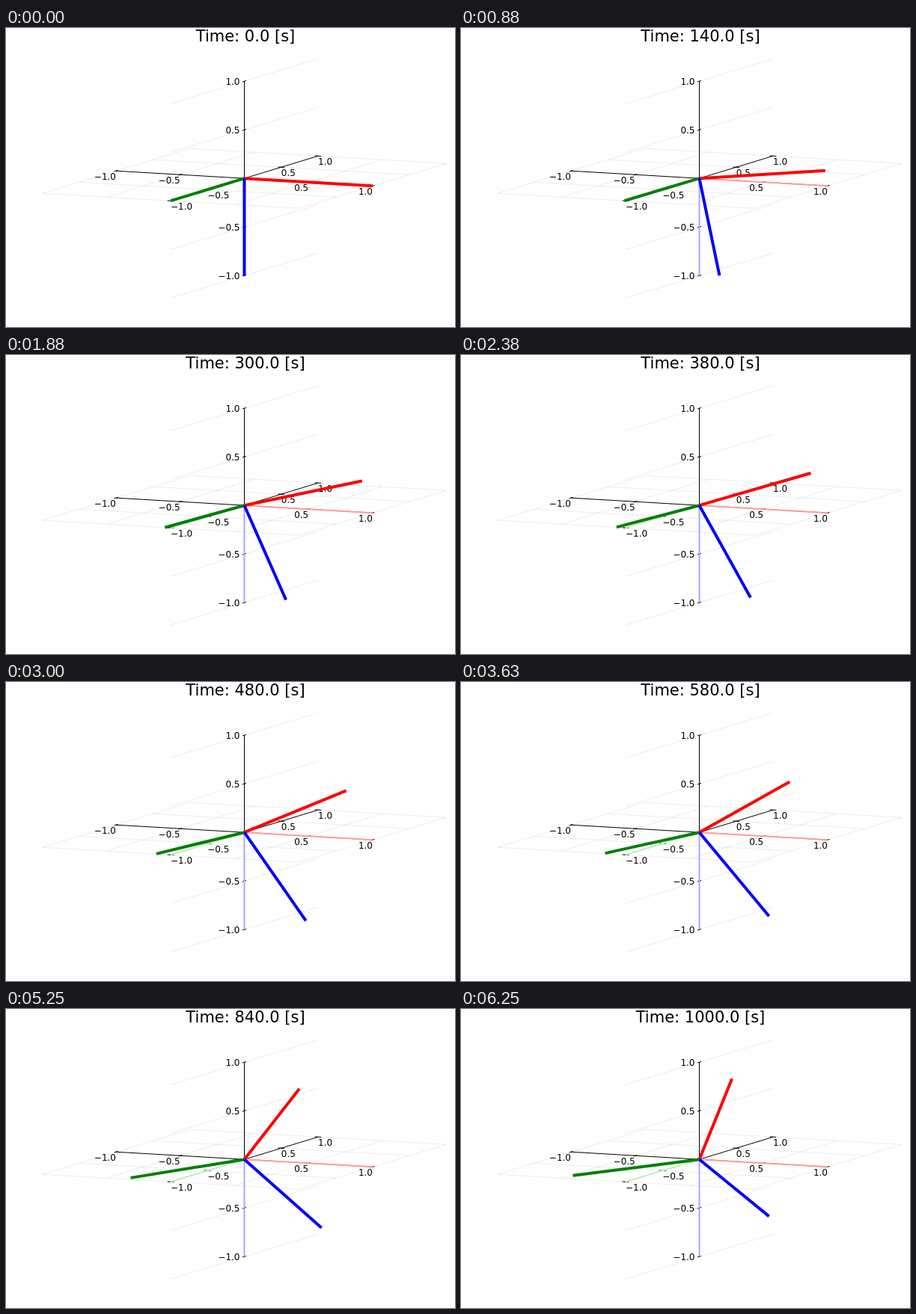
Animation of 600x400 px, one loop 6370 ms. Source, as an HTML page:

```html
<!DOCTYPE html>
<html lang="en">
<head>
<meta charset="utf-8">
<title>Rotating body axes</title>
<style>
  html, body { margin: 0; width: 100%; height: 100%; overflow: hidden; background: #fff; }
  svg { display: block; width: 600px; height: 400px; }
  text { font-family: "DejaVu Sans", sans-serif; font-size: 12px; fill: #000; }
  .title { font-size: 21px; text-anchor: middle; }
  .end { text-anchor: end; }
  .grid { stroke: #000; stroke-opacity: .1; stroke-width: .8; }
  .axis { stroke: #000; stroke-width: 1; }
  .rest { stroke-width: 2; }
  .body { stroke-width: 4; }
</style>
</head>
<body>
<svg id="stage" viewBox="0 0 600 400"></svg>
<script>
const stage = document.getElementById('stage');
const LOOP = 6370, STEP = 125, SECONDS_PER_STEP = 20, LAST = 50;
const RAD = Math.PI / 180;

// Orthographic view: screen position of a point in space
const project = ([x, y, z]) => [
  318.5 + 171.5 * x + 98.5 * y,
  201.2 + 10 * x - 30 * y - 130 * z
];

function add(tag, attrs, text = '') {
  const el = document.createElementNS('http://www.w3.org/2000/svg', tag);
  for (const k in attrs) el.setAttribute(k, attrs[k]);
  el.textContent = text;
  return stage.appendChild(el);
}

function place(el, a, b) {
  const [x1, y1] = project(a), [x2, y2] = project(b);
  el.setAttribute('x1', x1);
  el.setAttribute('y1', y1);
  el.setAttribute('x2', x2);
  el.setAttribute('y2', y2);
  return el;
}

const line = (cls, a, b, stroke) =>
  place(add('line', stroke ? { class: cls, stroke } : { class: cls }), a, b);

const ticks = [-1, -0.5, 0.5, 1];
const T = 0.025;

for (const v of ticks) {
  line('grid', [v, -1, 0], [v, 1, 0]);
  line('grid', [-1, v, 0], [1, v, 0]);
  line('grid', [0, -1, v], [0, 1, v]);
}

line('axis', [-1, 0, 0], [1, 0, 0]);
line('axis', [0, -1, 0], [0, 1, 0]);
line('axis', [0, 0, -1], [0, 0, 1]);

function label(v, point, dx, dy, cls) {
  const [x, y] = project(point);
  add('text', { x: x + dx, y: y + dy, class: cls }, v.toFixed(1).replace('-', '\u2212'));
}

for (const v of ticks) {
  line('axis', [v, -T, 0], [v, T, 0]);
  line('axis', [-T, v, 0], [T, v, 0]);
  line('axis', [0, -T, v], [0, T, v]);
  label(v, [v, 0, 0], 0, 12, 'end');
  label(v, [0, v, 0], 0, 11.8, 'start');
  label(v, [0, 0, v], -6, 4.5, 'end');
}

const origin = [0, 0, 0];
line('rest', origin, [1, 0, 0], '#ff9f9f');
line('rest', origin, [0, -1, 0], '#c6f0c6');
line('rest', origin, [0, 0, -1], '#a6a6ff');

const arms = ['#f00', '#008000', '#00f'].map(c => line('body', origin, origin, c));
const title = add('text', { class: 'title', x: 320, y: 18 });

// Steady pitch, with yaw growing as the square of time
function pose(sec) {
  const pitch = 0.0649 * sec * RAD, yaw = 2.88e-5 * sec * sec * RAD;
  const cp = Math.cos(pitch), sp = Math.sin(pitch);
  const cy = Math.cos(yaw), sy = Math.sin(yaw);
  return [
    [cp * cy, -cp * sy, sp],
    [-sy, -cy, 0],
    [sp * cy, -sp * sy, -cp]
  ];
}

// Steps start on whole hundredths of a second
function stepAt(ms) {
  const i = Math.min(LAST, Math.floor(ms / STEP));
  return Math.round(i * STEP / 10) * 10 > ms ? i - 1 : i;
}

let shown = -1;
function draw(ms) {
  const step = stepAt(ms);
  if (step === shown) return;
  shown = step;
  const sec = step * SECONDS_PER_STEP;
  pose(sec).forEach((tip, i) => place(arms[i], origin, tip));
  title.textContent = `Time: ${sec.toFixed(1)} [s]`;
}

const start = performance.now();
function tick() {
  draw((performance.now() - start) % LOOP);
  requestAnimationFrame(tick);
}
tick();
</script>
</body>
</html>
```
